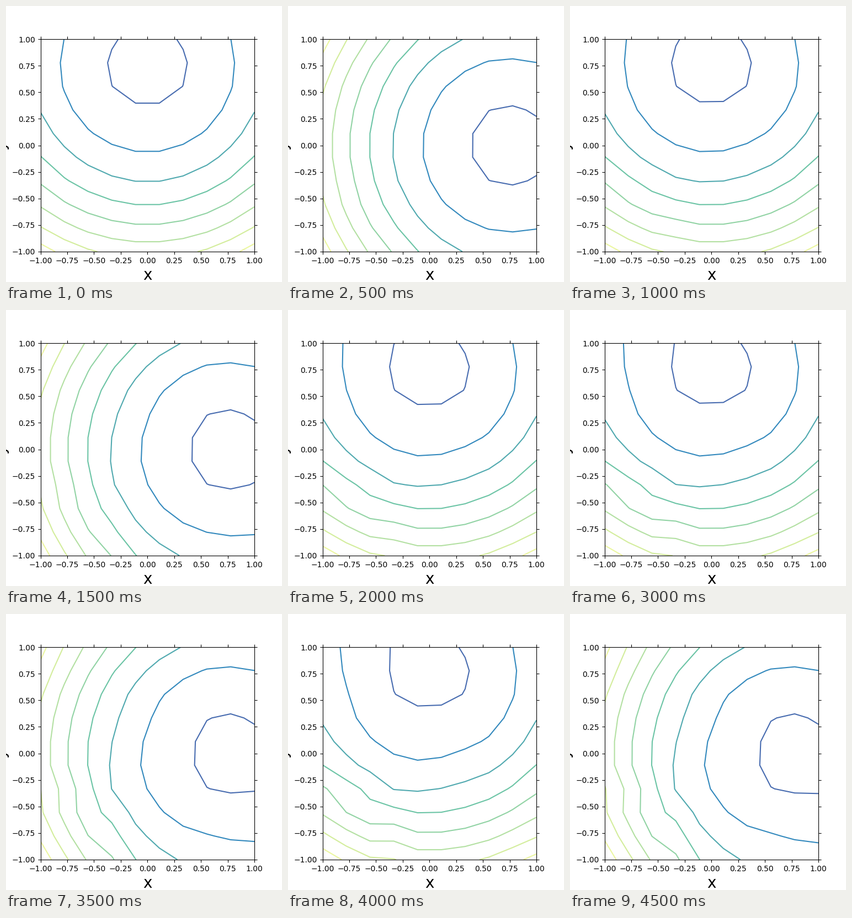
Animation, 500 px wide and 500 px high, one loop 5 s. Source, as a matplotlib script:

```python
import numpy as np
import matplotlib.pyplot as plt
from matplotlib.animation import FuncAnimation

FRAMES = 10
STEP_MS = 500
CENTRE = 0.75

axis = np.linspace(-1, 1, 10)
X, Y = np.meshgrid(axis, axis)
BOWL = X**2 + (Y - CENTRE)**2

# 20 evenly spaced heights; only the lower ones meet the surface
LEVELS = 0.1467 + 0.5245 * np.arange(-1, 19)


def bump(height, x, y, wx, wy):
    """Gaussian hill (or dip) on the grid."""
    return height * np.exp(-((X - x) / wx)**2 / 2 - ((Y - y) / wy)**2 / 2)


# Change of the surface over eight steps
DRIFT = (
    # lower left: ripples
    bump(0.175, -0.83, -0.33, 0.28, 0.07)
    + bump(-0.195, -0.28, -0.30, 0.11, 0.12)
    + bump(0.185, -0.33, -0.83, 0.06, 0.24)
    + bump(-0.125, -0.62, -0.60, 0.15, 0.12)
    + bump(0.170, -0.93, -0.90, 0.13, 0.13)
    # upper left edge
    + bump(0.075, -0.75, 0.50, 0.12, 0.12)
    + bump(-0.115, -0.70, 1.00, 0.28, 0.07)
    + bump(-0.048, -1.00, 0.22, 0.07, 0.22)
    # right half: gentle swells
    + bump(-0.078, 1.00, -0.80, 0.07, 0.36)
    + bump(0.060, 0.28, -0.08, 0.14, 0.28)
    + bump(0.058, 0.00, 0.42, 0.16, 0.12)
)

fig, ax = plt.subplots(figsize=(5, 5), dpi=100)
ax.set(xlim=(-1, 1), ylim=(-1, 1))
ax.tick_params(top=True, right=True)
ax.set_xlabel("x", fontsize=20)
ax.set_ylabel("y", fontsize=20)


def surface(n):
    """Drifting bowl, mirrored about the diagonal on every other step."""
    z = BOWL + DRIFT * n / 8
    return z.T if n % 2 else z


def update(n):
    for old in list(ax.collections):
        old.remove()
    ax.contour(X, Y, surface(n), levels=LEVELS, cmap="Spectral_r",
               vmin=LEVELS[0], vmax=LEVELS[-1], linewidths=1.5)
    return ax.collections


anim = FuncAnimation(fig, update, frames=FRAMES, interval=STEP_MS,
                     init_func=lambda: update(0), repeat=True,
                     repeat_delay=0, blit=False)
plt.show()
```
